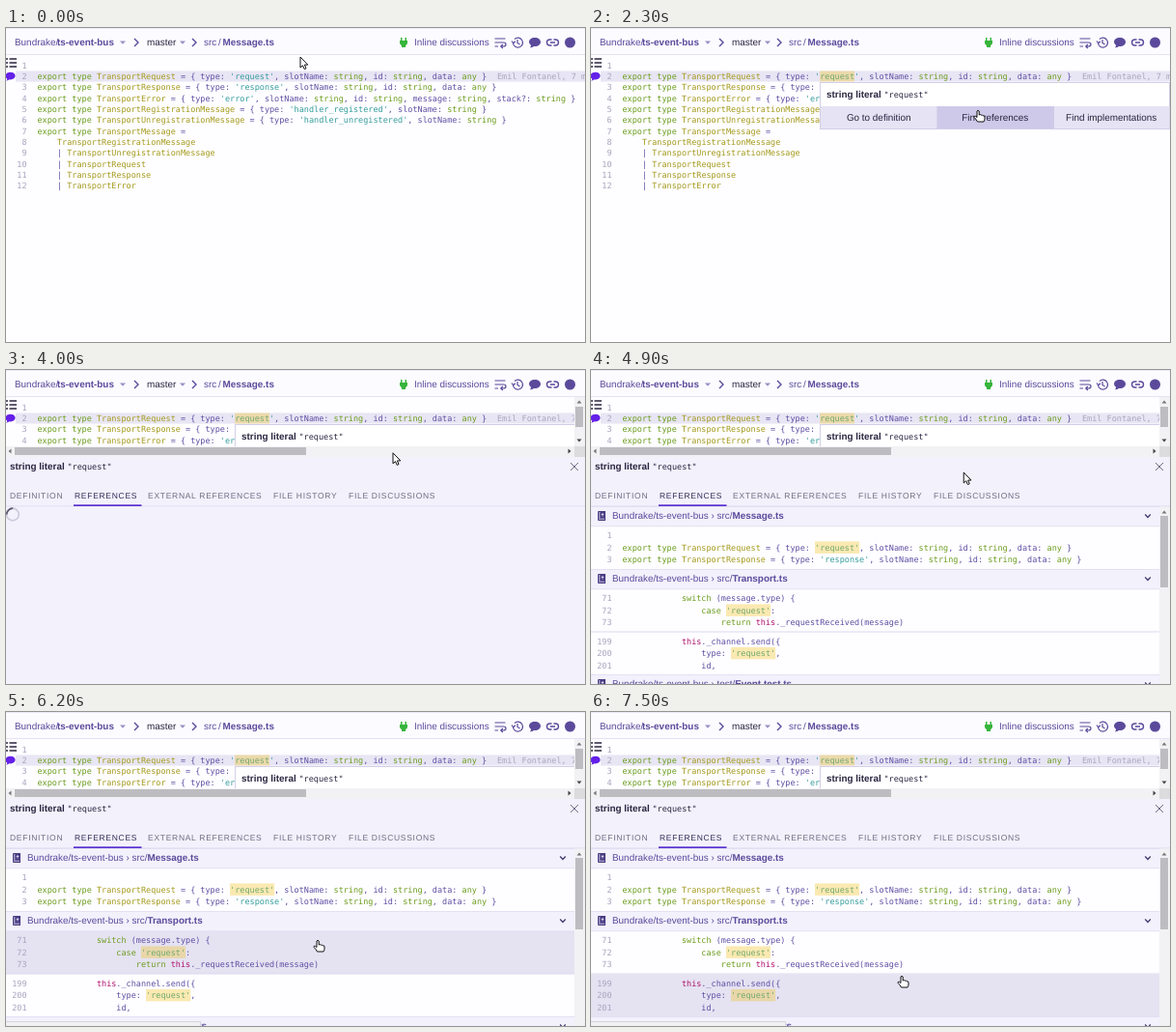
Animation, 600 px wide and 325 px high, one loop 7.6 s. Source, as an HTML page with a canvas:

```html
<!DOCTYPE html>
<html lang="en">
<head>
<meta charset="utf-8">
<title>Find references</title>
<style>
html, body { margin: 0; width: 100%; height: 100%; overflow: hidden; background: #fefdff; }
canvas { display: block; }
</style>
</head>
<body>
<canvas id="stage" width="600" height="325"></canvas>
<script>
const ctx = document.getElementById('stage').getContext('2d');
ctx.textRendering = 'geometricPrecision';

const LOOP = 7600, STEP = 100;
const HOVER = 1000, TOOLTIP = 1500, PANEL = 2700, RESULTS = 4300, STATUS = 5600;
const SANS = '"Liberation Sans", Arial, sans-serif';
const UI = '9.92px ' + SANS, BOLD = 'bold ' + UI;
const MONO = '8.5px "DejaVu Sans Mono", monospace';
const CHAR = 5.117, CODE_X = 32.5;
const OWNER = 'Bundrake', REPO = 'ts-event-bus', BLAME = 'Emil Fontanel, 7 months ago';
const C = {
  page: '#fefdff', panel: '#f3f1fc', border: '#dedaf0', row: '#e5e2f2', mark: 'rgba(240, 190, 20, .33)',
  ink: '#5b4a9b', dark: '#2b2540', muted: '#a9a5bf',
  keyword: '#6b9d1c', type: '#a39a1a', string: '#349d9b', self: '#b0106c', code: '#5f4fa3'
};

const SOURCE = [
  '',
  "export type TransportRequest = { type: 'request', slotName: string, id: string, data: any }",
  "export type TransportResponse = { type: 'response', slotName: string, id: string, data: any }",
  "export type TransportError = { type: 'error', slotName: string, id: string, message: string, stack?: string }",
  "export type TransportRegistrationMessage = { type: 'handler_registered', slotName: string }",
  "export type TransportUnregistrationMessage = { type: 'handler_unregistered', slotName: string }",
  'export type TransportMessage =',
  '    TransportRegistrationMessage',
  '    | TransportUnregistrationMessage',
  '    | TransportRequest',
  '    | TransportResponse',
  '    | TransportError'
];
const pad = n => ' '.repeat(n);
const BLOCKS = [
  { y: 162, h: 44, first: 1, lines: SOURCE.slice(0, 3) },
  { y: 227, h: 44, first: 71, lines: [
    pad(12) + 'switch (message.type) {',
    pad(16) + "case 'request':",
    pad(20) + 'return this._requestReceived(message)'] },
  { y: 271.5, h: 43.5, first: 199, lines: [
    pad(12) + 'this._channel.send({',
    pad(16) + "type: 'request',",
    pad(16) + 'id,'] }
];
const TABS = [['DEFINITION', 4], ['REFERENCES', 71], ['EXTERNAL REFERENCES', 147],
  ['FILE HISTORY', 277], ['FILE DISCUSSIONS', 355]];

// Pointer stops: time, x, y
const PATH = [[0, 305, 30], [200, 305, 30], [1000, 267, 54], [1700, 267, 54], [2200, 401, 85],
  [4700, 401, 86], [5300, 344, 163], [5700, 344, 163], [6100, 323, 236],
  [6800, 323, 236], [7300, 322, 273], [LOOP, 322, 273]];

function pointerAt(t) {
  const i = PATH.findIndex(p => p[0] > t);
  const [t0, x0, y0] = PATH[i - 1], [t1, x1, y1] = PATH[i];
  const u = (t - t0) / (t1 - t0), e = u * u * (3 - 2 * u);
  return { x: x0 + (x1 - x0) * e, y: y0 + (y1 - y0) * e };
}

function box(x, y, w, h, color) {
  ctx.fillStyle = color;
  ctx.fillRect(x, y, w, h);
}

function text(s, x, y, font, color, align = 'left') {
  ctx.font = font;
  ctx.fillStyle = color;
  ctx.textAlign = align;
  ctx.fillText(s, x, y);
}

function icon(d, x, y, { fill, stroke, width = 1.2 }) {
  const path = new Path2D(d);
  ctx.save();
  ctx.translate(x, y);
  if (fill) { ctx.fillStyle = fill; ctx.fill(path); }
  if (stroke) { ctx.strokeStyle = stroke; ctx.lineWidth = width; ctx.stroke(path); }
  ctx.restore();
}

function clipped(x, y, w, h, draw) {
  ctx.save();
  ctx.beginPath();
  ctx.rect(x, y, w, h);
  ctx.clip();
  draw();
  ctx.restore();
}

function tokenColor(token) {
  if (token[0] === "'") return C.string;
  if (token === 'this') return C.self;
  if (/^Transport/.test(token)) return C.type;
  if (/^(export|type\b(?= )|switch|case|return|string|any)/.test(token)) return C.keyword;
  return C.code;
}

function code(line, y) {
  const tokens = /'[^']*'|type (?=T)|\w+|[^\w\s']+/g;
  for (const m of line.matchAll(tokens))
    text(m[0], CODE_X + m.index * CHAR, y, MONO, tokenColor(m[0]));
}

const lineNumber = (n, y) => text(n, 21.5, y, MONO, C.muted, 'right');

function caret(x) {
  icon('M-3 -1.5H3L0 1.8Z', x, 15, { fill: '#9a8fc4' });
}

function header() {
  box(0, 0, 600, 27, '#fcfbff');
  box(0, 0, 600, 1, '#eeebf8');
  box(0, 27, 600, 1, '#e6e2f4');
  text(OWNER + '/', 9, 18, UI, C.ink);
  text(REPO, 53, 18, BOLD, C.ink);
  caret(121);
  icon('M-2 -4L2 0L-2 4', 135, 15, { stroke: C.ink, width: 1.4 });
  text('master', 146, 18, UI, C.dark);
  caret(183);
  icon('M-2 -4L2 0L-2 4', 195, 15, { stroke: C.ink, width: 1.4 });
  text('src', 205, 18, UI, C.ink);
  text('/', 220, 18, UI, C.ink);
  text('Message.ts', 224.5, 18, BOLD, C.ink);

  icon('M-3 -5H-1.5V-2H1.5V-5H3V-2H4V1L2 3.5V5H-2V3.5L-4 1V-2H-3Z', 412, 15, { fill: '#37b53c' });
  text('Inline discussions', 423, 18, UI, C.ink);
  icon('M-5.5 -4H5.5M-5.5 0H3.5Q6 0 6 2T3.5 4H1M-5.5 4H-2M2.8 2L.8 4L2.8 6', 512, 15, { stroke: C.ink });
  icon('M-4.5 1A5 5 0 1 0 -3 -3.5M-6 -1.5L-4.3 .8L-2.2 -1.2M0 -3V.5L2.5 2', 530, 15, { stroke: C.ink });
  speech(548, 15, 1, C.ink);
  icon('M-1 -3H-3A3 3 0 0 0 -3 3H-1M1 -3H3A3 3 0 0 1 3 3H1M-2.5 0H2.5', 566.5, 15, { stroke: C.ink, width: 1.4 });
  icon('M5.5 0A5.5 5.5 0 1 1 -5.5 0A5.5 5.5 0 1 1 5.5 0Z', 584.5, 15, { fill: C.ink });
}

function speech(x, y, scale, color) {
  ctx.save();
  ctx.translate(x, y);
  ctx.scale(scale, scale);
  icon('M0 -5C3.6 -5 6 -3 6 -.5S3.6 4 0 4L-1 3.9Q-3 5.5 -5 5.2Q-3.8 4 -4 2.8Q-6 1.5 -6 -.5C-6 -3 -3.6 -5 0 -5Z', 0, 0, { fill: color });
  ctx.restore();
}

function editor(t) {
  box(10, 44.5, 590, 11, '#e8e5f4');
  SOURCE.forEach((line, i) => {
    const y = 41.8 + i * 11.3;
    lineNumber(i + 1, y);
    code(line, y);
  });
  if (t >= HOVER) box(CODE_X + 40 * CHAR, 44.5, 7 * CHAR, 11, C.mark);
  text(BLAME, 509, 53, MONO, '#aaa6bd');
  icon('M0 0H2M3.5 0H11M0 4H2M3.5 4H11M0 8H2M3.5 8H11', 0, 32, { stroke: C.dark, width: 1.5 });
  speech(4.5, 50, .85, '#6420e8');
}

function title(x, y) {
  text('string literal', x, y, BOLD, C.dark);
  text('"request"', x + 59.5, y, MONO, C.dark);
}

function tooltip(p) {
  box(237, 56, 363, 49, '#d3cfe8');
  box(238, 57, 361, 47, '#fff');
  title(244, 72.3);
  ['Go to definition', 'Find references', 'Find implementations'].forEach((label, i) => {
    const x = 238 + i * 120.5;
    const over = p.y >= 81 && p.x >= x && p.x < x + 120.5;
    box(x, 81, 120.5, 23, over ? '#cec9e9' : '#e6e3f4');
    if (i) box(x, 81, 1, 23, '#cfcae6');
    text(label, x + 60.2, 96, UI, C.dark, 'center');
  });
}

function editorScrollbars() {
  box(589, 28, 11, 51, '#f2f1f4');
  box(590, 38, 8, 21, '#bdbcc0');
  icon('M-2.5 1.5L0 -1.5L2.5 1.5Z', 594, 33, { fill: '#777' });
  icon('M-2.5 -1.5L0 1.5L2.5 -1.5Z', 594, 73, { fill: '#444' });
  box(0, 79, 589, 11, '#f2f1f4');
  box(589, 79, 11, 11, '#dcdcdf');
  box(9, 80, 302, 8, '#bdbcc0');
  icon('M1.5 -2.5L-1.5 0L1.5 2.5Z', 4, 84, { fill: '#777' });
  icon('M-1.5 -2.5L1.5 0L-1.5 2.5Z', 584, 84, { fill: '#444' });
}

function fileHeader(y, folder, file) {
  box(0, y, 589, 21, C.panel);
  box(0, y, 589, .7, C.border);
  box(0, y + 20.5, 589, .7, C.border);
  const mid = y + 10, path = `${OWNER}/${REPO} › ${folder}/`;
  icon('M-3 -5H4V5H-3Q-4 5 -4 4V-4Q-4 -5 -3 -5Z', 11, mid, { fill: '#4a3c82' });
  icon('M-2.2 -4V2.5M-3 3.2H3M1 -3V.5M-.3 -1.5H2.3', 11, mid, { stroke: '#e9e5f8', width: .8 });
  text(path, 22, mid + 3.3, UI, C.ink);
  text(file, 22 + ctx.measureText(path).width, mid + 3.3, BOLD, C.ink);
  icon('M-2.8 -1.5L0 1.5L2.8 -1.5', 577, mid, { stroke: '#40366b', width: 1.2 });
}

function results(t, p) {
  box(0, 141, 589, 184, C.page);
  for (const b of BLOCKS) {
    if (t >= 4800 && p.y >= b.y && p.y < b.y + b.h) box(0, b.y, 589, b.h, C.row);
    b.lines.forEach((line, i) => {
      const y = b.y + 12 + i * 12.6;
      const at = line.indexOf("'request'");
      lineNumber(b.first + i, y);
      code(line, y);
      if (at >= 0) box(CODE_X + at * CHAR, y - 9.2, 9 * CHAR, 12.5, C.mark);
    });
  }
  box(0, 270.5, 589, 1, C.border);
  fileHeader(141, 'src', 'Message.ts');
  fileHeader(206, 'src', 'Transport.ts');
  fileHeader(315, 'test', 'Event.test.ts');
  box(589, 141, 11, 184, '#f2f1f4');
  box(590, 151, 8, 74, '#bdbcc0');
  icon('M-2.5 1.5L0 -1.5L2.5 1.5Z', 594, 147, { fill: '#777' });
  if (t >= STATUS) {
    box(0, 320, 202, 5, '#d6d4dc');
    box(0, 321, 201, 4, '#f1f0f3');
  }
}

function spinner(t) {
  const a = (t / 800 + .5) * Math.PI * 2;
  ctx.lineWidth = 1.7;
  [[0, Math.PI * 2, '#cfcbdc'], [a, a + 1.6, '#5d5870']].forEach(([from, to, color]) => {
    ctx.strokeStyle = color;
    ctx.beginPath();
    ctx.arc(7, 149.5, 6.3, from, to);
    ctx.stroke();
  });
}

function panel(t, p) {
  box(0, 90, 600, 235, C.panel);
  title(4, 103.3);
  icon('M-4 -4L4 4M4 -4L-4 4', 589, 100, { stroke: '#625a7c', width: .9 });
  ctx.letterSpacing = '0.71px';
  TABS.forEach(([label, x], i) =>
    text(label, x, 133, '8.5px ' + SANS, i === 1 ? '#342b58' : '#6f6b82'));
  ctx.letterSpacing = '0px';
  if (t >= RESULTS) results(t, p);
  else spinner(t);
  box(0, 140.5, 600, .8, C.border);
  box(70, 139.3, 70.5, 1.7, '#5a32d0');
}

function pointer(t, p) {
  const look = { fill: '#fff', stroke: '#111', width: 1 };
  const button = t >= TOOLTIP && t < PANEL && p.y >= 81;
  const result = t >= RESULTS && p.y >= 141;
  if (button || result) {
    icon('M-1 1Q0 -.4 1.2 1V5Q2.4 4 3.2 5.2Q4.6 4.4 5.2 5.8Q7 5.4 7 7V9Q7 10.5 6 12H-.5Q-1.5 10 -4 7.2Q-4 5.6 -2.4 6.4L-1 7.5Z', p.x, p.y, look);
  } else if (t < TOOLTIP + 300 && p.y > 44) {
    const beam = 'M-2.5 -5.5Q0 -5.5 0 -4Q0 -5.5 2.5 -5.5M0 -4V4M-2.5 5.5Q0 5.5 0 4Q0 5.5 2.5 5.5M-1.5 1H1.5';
    icon(beam, p.x, p.y, { stroke: '#fff', width: 2.6 });
    icon(beam, p.x, p.y, { stroke: '#111', width: 1.3 });
  } else {
    icon('M0 0V11L2.5 8.8L4.2 12.6L6 11.8L4.4 8.1H7.8Z', p.x, p.y, look);
  }
}

function frame(now) {
  const t = Math.floor(now % LOOP / STEP) * STEP;
  const p = pointerAt(t);
  const open = t >= PANEL;
  box(0, 0, 600, 325, C.page);
  clipped(0, 28, open ? 589 : 600, open ? 51 : 297, () => {
    editor(t);
    if (t >= TOOLTIP) tooltip(p);
  });
  header();
  if (open) {
    editorScrollbars();
    panel(t, p);
  }
  pointer(t, p);
}

const start = performance.now();
function tick() {
  frame(performance.now() - start);
  requestAnimationFrame(tick);
}
tick();
</script>
</body>
</html>
```
